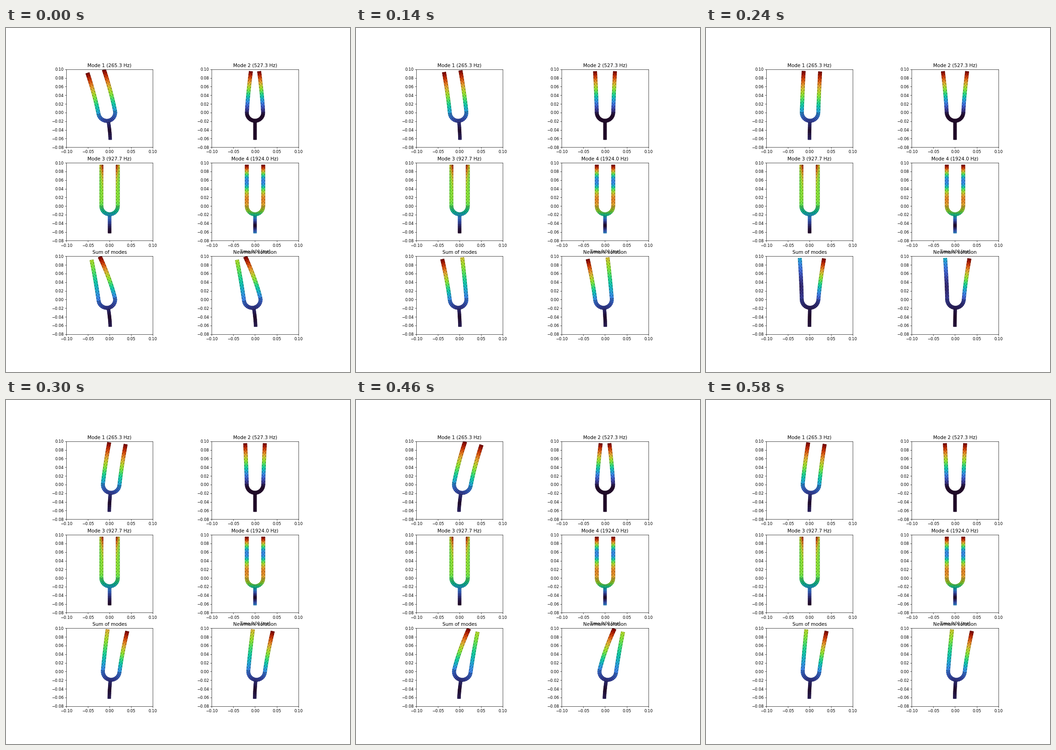
A matplotlib script for the animation above (600 ms loop, 748 by 748 pixels).

```python
import numpy as np
import matplotlib.pyplot as plt
from matplotlib.animation import FuncAnimation
from matplotlib.collections import LineCollection
from matplotlib.tri import Triangulation

FRAMES, INTERVAL = 30, 20
FREQS = np.array([265.3, 527.3, 927.7, 1924.0])
DT = 8.68e-5
OMEGA = 2 * np.pi * FREQS[:2] * DT        # phase advance per frame
OMEGA_NEWMARK = 2 * np.arctan(OMEGA / 2)  # average-acceleration period error

# Fork geometry in millimetres
R, HALF, TOP = 19.0, 4.0, 95.0
STEM, BOTTOM = 3.5, -62.5
LENGTH = TOP - BOTTOM


def strip(to_xy, cells, layers=1):
    """Split a mapped (s, t) unit square into cells of four triangles."""
    tris = []
    for i in range(cells):
        for j in range(layers):
            s0, s1 = i / cells, (i + 1) / cells
            t0, t1 = j / layers, (j + 1) / layers
            ring = [to_xy(*p) for p in ((s0, t0), (s1, t0), (s1, t1), (s0, t1))]
            mid = to_xy((s0 + s1) / 2, (t0 + t1) / 2)
            tris += [(ring[k], ring[(k + 1) % 4], mid) for k in range(4)]
    return tris


def prong(side):
    return lambda s, t: (side * R + HALF * (2 * t - 1), TOP * s)


def arc(s, t):
    r, a = R + HALF * (2 * t - 1), np.pi * (1 + s)
    return r * np.cos(a), r * np.sin(a)


def stem(s, t):
    return STEM * (2 * t - 1), BOTTOM + s * (-22.7 - BOTTOM)


corners = np.array(strip(stem, 10, 2) + strip(arc, 16, 2)
                   + strip(prong(-1), 13) + strip(prong(1), 13))
nodes, index = np.unique(corners.reshape(-1, 2).round(6) + 0.0, axis=0, return_inverse=True)
triangles = index.reshape(-1, 3)
edges = Triangulation(*nodes.T, triangles).edges
X, Y = nodes.T

# Centreline position belonging to each node
side = np.sign(X)
centre = np.where(Y < 0, R * X / np.hypot(X, Y), R * side)
offset = X - centre
inward = -side * offset / HALF


def power_curve(y, start, amp, p):
    """Deflection growing as a power of height, and its slope."""
    span = TOP - start
    q = np.clip((y - start) / span, 0, 1)
    return amp * q ** p, amp * p / span * q ** (p - 1)


# Mode 1: the whole fork sways; mode 2: the prongs pinch together
sway, turn = power_curve(Y, BOTTOM, 33.4, 1.566)
root_turn = power_curve(np.minimum(Y, 0), BOTTOM, 33.4, 1.566)[1]
mode1 = np.column_stack([1.38 - sway, turn * offset + root_turn * centre])

pinch, tilt = power_curve(Y, -8, 9.4, 1.4)
lean = np.where(Y < 0, np.clip(X / R, -1, 1), side)
mode2 = np.column_stack([-pinch * lean, tilt * side * offset])

# Modes 3 and 4 are too small to see move: only their magnitude shows
height = np.clip(Y / TOP, 0, 1)
lift = np.minimum((Y - BOTTOM) / 80, 1)
mag3 = 0.225 * (1 - np.cos(np.pi * lift)) + 0.28 * height ** 4 + 0.2 * height ** 2 * inward
wave = np.cos(np.pi / 2 * (Y - 15) / np.where(Y < 15, 60, 42))
mag4 = np.hypot((0.72 + 0.28 * height ** 4) * np.abs(wave) ** 1.4,
                0.2 * np.clip(Y / 40, 0, 1))

fig, axes = plt.subplots(3, 2, figsize=(12, 12), dpi=748 / 12)
panels = axes.ravel()
titles = [f"Mode {k + 1} ({f:.1f} Hz)" for k, f in enumerate(FREQS)]
titles += ["Sum of modes", "Newmark solution"]
for ax, title in zip(panels, titles):
    ax.set_aspect("equal")
    ax.set(xlim=(-0.1, 0.1), ylim=(-0.08, 0.1), title=title,
           xticks=np.linspace(-0.1, 0.1, 5), yticks=np.linspace(-0.08, 0.1, 10))
    ax.grid(alpha=0.3)
panels[5].text(0.5, 1.05, "Time 0.00 [ms]", ha="center", transform=panels[5].transAxes)


def draw_fork(ax, disp, mag=None):
    """Replace the fork in a panel, coloured by displacement unless told otherwise."""
    for old in list(ax.collections):
        old.remove()
    points = (nodes + disp) * 1e-3
    if mag is None:
        mag = np.hypot(*disp.T)
    ax.tripcolor(Triangulation(*points.T, triangles), mag, shading="gouraud", cmap="turbo")
    ax.add_collection(LineCollection(points[edges], colors="k", linewidths=0.3, zorder=1.1),
                      autolim=False)


draw_fork(panels[2], 0 * nodes, mag3)
draw_fork(panels[3], 0 * nodes, mag4)


def update(n):
    a, b = np.cos(OMEGA * n)
    c, d = np.cos(OMEGA_NEWMARK * n)
    draw_fork(panels[0], a * mode1)
    draw_fork(panels[1], b * mode2)
    draw_fork(panels[4], a * mode1 + b * mode2)
    draw_fork(panels[5], c * mode1 + d * mode2)
    return []


anim = FuncAnimation(fig, update, frames=FRAMES, interval=INTERVAL,
                     repeat=True, repeat_delay=0, blit=False)
plt.show()
```
